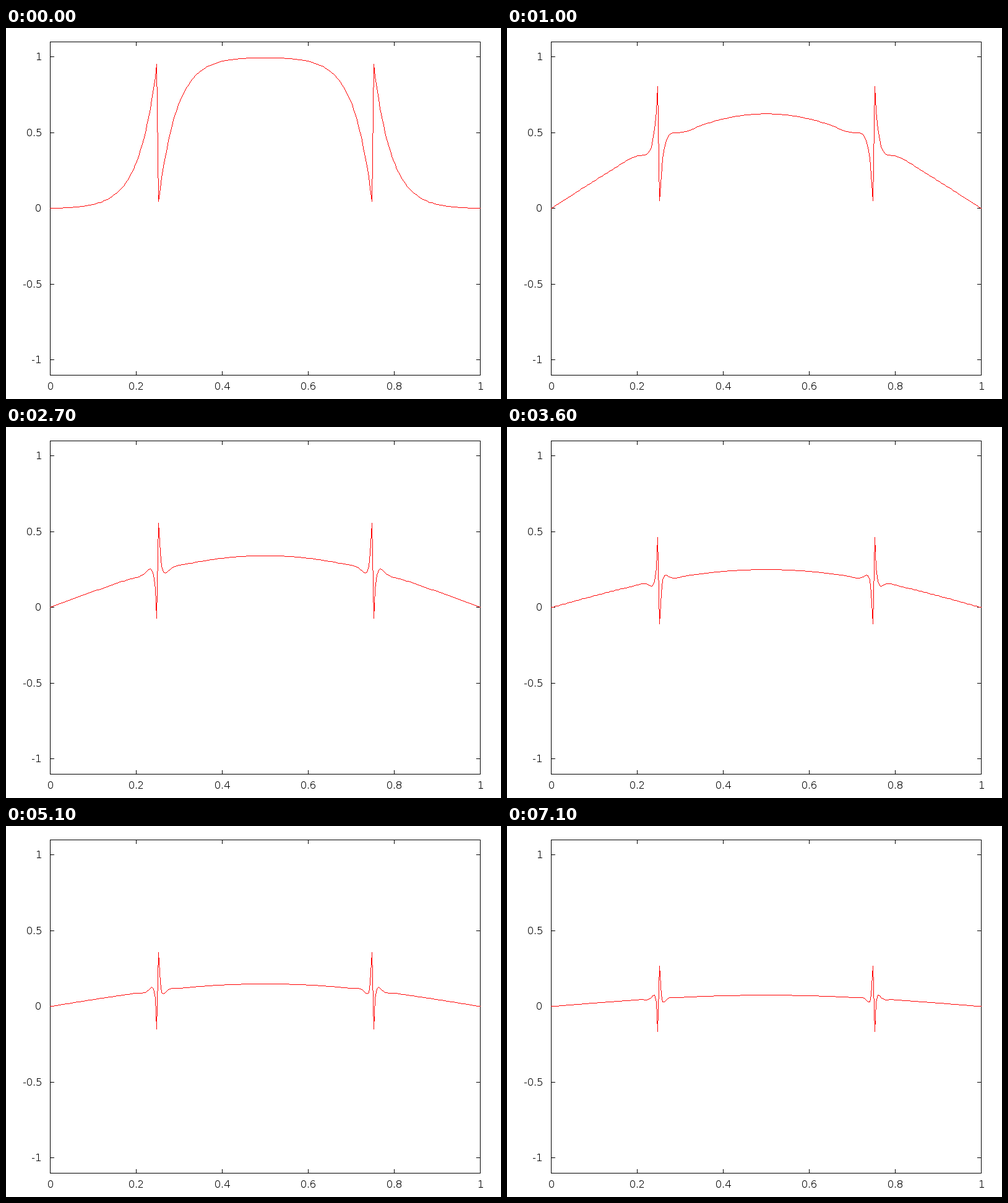
Animation, 800 px wide and 600 px high, one loop 7200 ms. Source, as a matplotlib script:

```python
import numpy as np
import matplotlib.pyplot as plt
from matplotlib.animation import FuncAnimation

W, H, DPI = 800, 600, 100
PX = 72 / DPI  # one pixel in points
LEFT, RIGHT, TOP, BOTTOM = 71, 766, 22, 561
TICK = 6
RED = (255, 0, 0, 255)
FRAMES, INTERVAL = 72, 100

plt.rcParams["text.hinting"] = "default"
plt.rcParams["text.hinting_factor"] = 1

# Heat equation by Crank-Nicolson, advanced mode by mode.
CELLS = 258
DT = 0.0035
x = np.arange(CELLS + 1) / CELLS
k = np.arange(1, CELLS)
modes = np.sin(np.pi * np.outer(x, k))
start = ((x > 0.25) & (x < 0.75)).astype(float)
weights = 2 / CELLS * modes.T @ start
z = 2 * DT * CELLS**2 * np.sin(np.pi * k / (2 * CELLS)) ** 2
growth = (1 - z) / (1 + z)


def heat(step):
    u = modes @ (weights * growth**step)
    u[0] = u[-1] = 0
    return u


def nearest(v):
    return np.floor(np.round(v, 6) + 0.5).astype(int)


def col(v):
    return nearest(LEFT + (RIGHT - LEFT) * np.asarray(v))


def row(v):
    return BOTTOM - nearest((BOTTOM - TOP) * (np.asarray(v) + 1.1) / 2.2)


def trace(cols, rows):
    """Layer holding a one-pixel polyline without smoothing."""
    layer = np.zeros((H, W, 4), np.uint8)
    points = list(zip(cols, rows))
    for (c0, r0), (c1, r1) in zip(points, points[1:]):
        n = max(abs(c1 - c0), abs(r1 - r0)) + 1
        layer[nearest(np.linspace(r0, r1, n)),
              nearest(np.linspace(c0, c1, n))] = RED
    return layer


fig = plt.figure(figsize=(W / DPI, H / DPI), dpi=DPI, facecolor="white")
ax = fig.add_axes([0, 0, 1, 1])
ax.axis("off")


def rule(cols, rows):
    ax.plot(np.add(cols, 0.5), np.add(rows, 0.5), color="black", lw=PX,
            snap=False, solid_capstyle="projecting", solid_joinstyle="miter")


def label(px, py, value, align):
    ax.text(px, py, f"{value:g}", ha=align, va="baseline", color="black",
            family="DejaVu Sans", size=16 * PX)


rule([LEFT, RIGHT, RIGHT, LEFT, LEFT], [TOP, TOP, BOTTOM, BOTTOM, TOP])

for v in (0, 0.2, 0.4, 0.6, 0.8, 1):
    c = col(v)
    rule([c, c], [TOP, TOP + TICK])
    rule([c, c], [BOTTOM, BOTTOM - TICK])
    label(c + 0.5, 585, v, "center")

for v in (-1, -0.5, 0, 0.5, 1):
    y = row(v)
    rule([LEFT, LEFT + TICK], [y, y])
    rule([RIGHT, RIGHT - TICK], [y, y])
    label(57.5, y + 6, v, "right")

curve = ax.imshow(trace(col(x), row(heat(1))), extent=(0, W, H, 0),
                  interpolation="nearest", aspect="auto", zorder=5)
ax.set_xlim(0, W)
ax.set_ylim(H, 0)


def update(frame):
    curve.set_data(trace(col(x), row(heat(frame + 1))))
    return curve,


anim = FuncAnimation(fig, update, frames=FRAMES, interval=INTERVAL,
                     repeat=True, repeat_delay=0)
plt.show()
```
